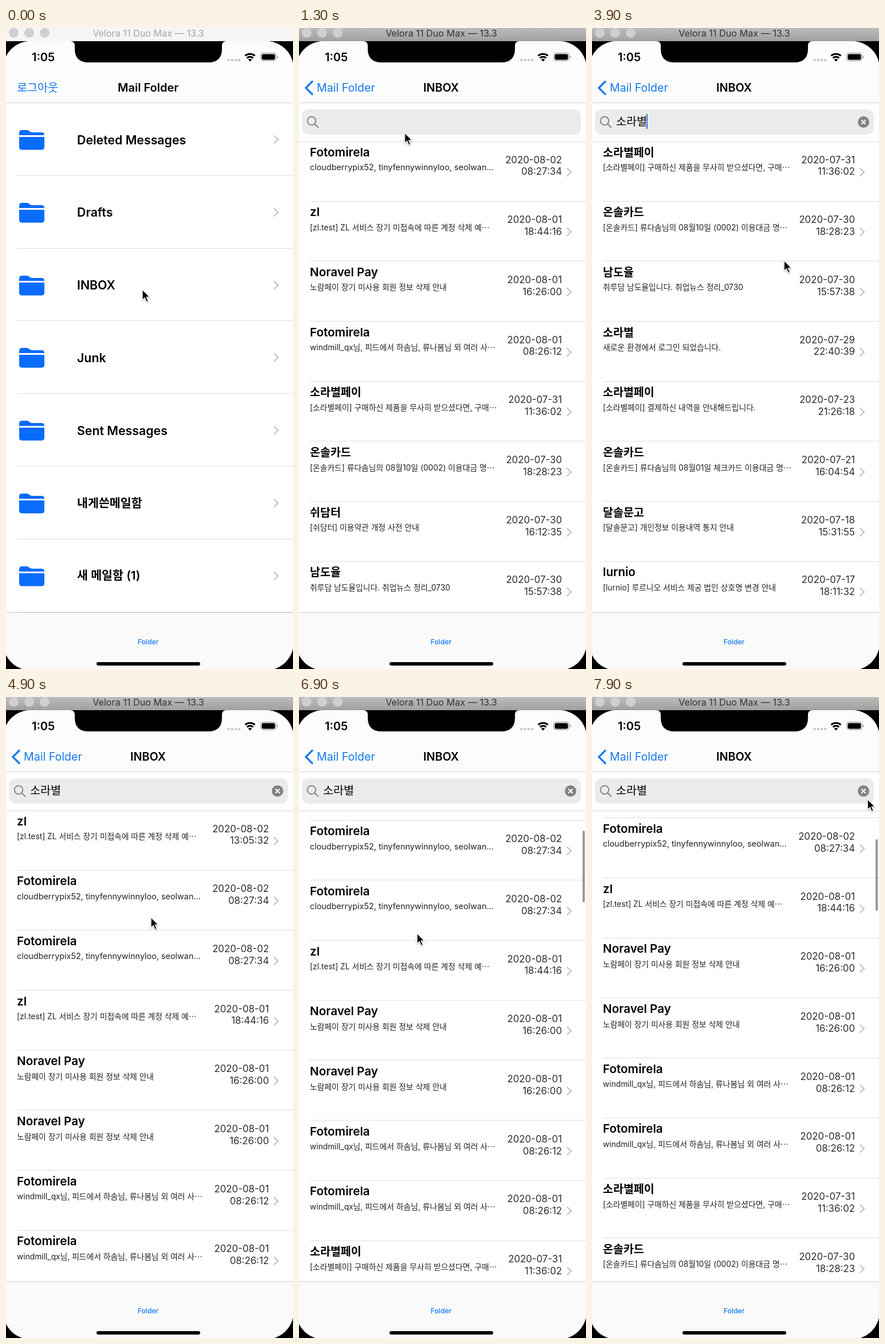
These frames come from a looping animation (501x1118 px, 8 s). An HTML page:

```html
<!DOCTYPE html>
<html lang="ko">
<head>
<meta charset="utf-8">
<title>Mail</title>
<style>
@property --push { syntax: "<number>"; inherits: true; initial-value: 0; }
@property --scroll { syntax: "<number>"; inherits: true; initial-value: 0; }

html, body { margin: 0; width: 100%; height: 100%; overflow: hidden; background: #000; }
body { position: relative; font-family: Inter, "Noto Sans CJK KR", "Noto Sans CJK", sans-serif; color: #000; }
div, b, p, time, svg, .label { position: absolute; margin: 0; white-space: nowrap; }
b { font-weight: 600; }
.label { line-height: 0; }
.blue { color: #1478f0; }

/* window title bar */
#bar { left: 0; top: 0; width: 501px; height: 23px; animation: bar 8s step-end infinite; }
#bar .label { left: 0; width: 497px; top: 9px; text-align: center; font-size: 16.2px; }
#bar i { position: absolute; top: 0; width: 17px; height: 17px; border-radius: 50%; animation: light 8s step-end infinite; }
#bar i:nth-of-type(1) { left: 5px; background: #fc4a48; }
#bar i:nth-of-type(2) { left: 32px; background: #fdb224; }
#bar i:nth-of-type(3) { left: 59px; background: #28c231; }
@keyframes bar {
  0% { background: #f5f5f5; color: #a5a5a5; }
  1.25%, 100% { background: linear-gradient(#bcbcbc, #a0a0a0); color: #333; }
}
@keyframes light { 0% { background: #cfcfcf; } }

/* phone screen */
#screen {
  left: 0; top: 0; width: 501px; height: 1118px; background: #fff;
  clip-path: inset(23px -1px -2px -5px round 48px);
  animation: push 8s infinite, scroll 8s infinite;
}
@keyframes push {
  0%, 3.625% { --push: 0; animation-timing-function: cubic-bezier(.38, .7, .125, 1); }
  9.875%, 100% { --push: 1; }
}
@keyframes scroll {
  0%, 72.5% { --scroll: 0; animation-timing-function: ease-in; }
  77.5% { --scroll: 15; animation-timing-function: linear; }
  86.25% { --scroll: 87; animation-timing-function: ease-out; }
  95%, 100% { --scroll: 196; }
}

#nav { left: 0; top: 0; width: 501px; height: 130px; background: #fcfcfc; border-bottom: 1px solid #cfcfcf; }
#nav .label { top: 104px; font-size: 20px; }
#nav .hangul { left: 19px; font-size: 19.6px; opacity: calc(1 - var(--push)); }
#nav .old, #nav .back { left: 31px; transform: translateX(calc((1 - var(--push)) * 164px)); }
#nav .old { opacity: calc(1 - 2 * var(--push)); }
#nav .back { font-size: 19.6px; opacity: calc(2 * var(--push) - 1); }
#nav .new { left: 217px; font-size: 19.8px; opacity: var(--push); transform: translateX(calc((1 - var(--push)) * 290px)); }
#nav .arrow { opacity: var(--push); }

#tabs { left: 0; top: 1019px; width: 501px; height: 99px; background: #fafafa; border-top: 1px solid #cdcdcd; }
#tabs .label { left: 0; width: 496px; top: 51px; text-align: center; font-size: 12.2px; font-weight: 500; }
#home { left: 158px; top: 1106px; width: 181px; height: 6px; border-radius: 3px; background: #000; }

.page { left: 0; top: 131px; width: 501px; height: 889px; }
#folders { transform: translateX(calc(var(--push) * -152px)); }
#dim { left: -5px; top: 131px; width: 507px; height: 889px; background: #000; opacity: calc(var(--push) * .12); }
#inbox { transform: translateX(calc((1 - var(--push)) * 507px)); }
#inbox::before { content: ""; position: absolute; inset: 0 -1px 0 -5px; background: #fff; }

/* rows */
.row { left: 0; width: 501px; }
.row::after { content: ""; position: absolute; left: 19px; right: 0; bottom: 0; height: 1px; background: #dedede; }
.row > i { position: absolute; left: 463px; width: 9px; height: 9px; border: solid #c1c1c4; border-width: 2.4px 2.4px 0 0; transform: rotate(45deg); }
.folder { height: 126.8px; }
.folder b { left: 124px; top: 63.5px; font-size: 21.3px; line-height: 0; }
.folder b.hangul { font-size: 20.6px; }
.folder > i { top: 58px; }
.folder svg { left: 23px; top: 46px; }
.folder:nth-child(3)::before { content: ""; position: absolute; inset: 0 0 0 -5px; background: #d0d0d5; visibility: hidden; animation: tap 8s step-end infinite; }
@keyframes tap { 0% { visibility: hidden; } 1.25%, 100% { visibility: visible; } }

.mail { height: 104.7px; }
.mail b { left: 19px; top: 18.5px; font-size: 20.6px; line-height: 0; }
.mail b.hangul { font-size: 19.5px; }
.mail p { left: 19px; top: 45px; font-size: 14.4px; line-height: 0; color: #222; }
.mail p.hangul { font-size: 13.8px; }
.mail time { right: 42px; top: 21.6px; font-size: 16.8px; line-height: 20.8px; text-align: right; color: #2c2c2c; }
.mail > i { top: 47.5px; }

#lists { left: 0; top: 67px; width: 501px; height: 822px; overflow: hidden; border-top: 1px solid #dcdcdc; box-sizing: border-box; }
.list { left: 0; top: -1px; width: 501px; height: 100%; animation: 8s step-end infinite; }
#all { animation-name: all; }
#found { animation-name: found; }
#merged { animation-name: merged; transform: translateY(calc(var(--scroll) * -1px)); }
@keyframes all { 0% { visibility: visible; } 30%, 100% { visibility: hidden; } }
@keyframes found { 0%, 50%, 100% { visibility: hidden; } 30% { visibility: visible; } }
@keyframes merged { 0% { visibility: hidden; } 50%, 100% { visibility: visible; } }

#thumb {
  left: 495px; top: 90px; width: 4px; height: 125px; border-radius: 2px; background: #999;
  transform: translateY(calc(var(--scroll) * .1376px)); animation: thumb 8s linear infinite;
}
@keyframes thumb { 0%, 72.5% { opacity: 0; } 75%, 100% { opacity: 1; } }

/* search field */
#field { left: 5px; top: 11px; width: 487px; height: 44px; border-radius: 12px; background: #ebebeb; }
#field .label { left: 37px; top: 21px; font-size: 19.6px; }
#field .label::before { content: ""; animation: type 8s step-end infinite; }
#caret { display: inline-block; width: 2px; height: 26px; margin-bottom: -20px; vertical-align: 0; background: #456be0; position: absolute; top: -13px; margin-left: -1px; animation: blink 8s step-end infinite; }
#clear { left: 459px; top: 12px; animation: clear 8s step-end infinite; }
@keyframes type {
  0% { content: ""; }
  20% { content: "ㅅ"; }
  21.25% { content: "소"; }
  22.5% { content: "솔"; }
  23.75% { content: "소라"; }
  25% { content: "소랍"; }
  26.25% { content: "소라벼"; }
  27.5%, 100% { content: "소라별"; }
}
@keyframes blink {
  0%, 40%, 57.5%, 70%, 82.5%, 95%, 100% { opacity: 0; }
  17.5%, 45%, 63.75%, 76.25%, 88.75% { opacity: 1; }
}
@keyframes clear { 0% { visibility: hidden; } 20%, 100% { visibility: visible; } }

#cursor { left: -2px; top: -2px; animation: point 8s infinite; filter: drop-shadow(0 1px 1px #0005); }
@keyframes point {
  0%, 2.5% { transform: translate(238px, 456px); }
  6.25% { transform: translate(137px, 314px); }
  12.5%, 15% { transform: translate(140px, 235px); }
  17.5%, 43.75% { transform: translate(195px, 170px); }
  56.25% { transform: translate(400px, 514px); }
  61.25% { transform: translate(253px, 384px); }
  67.5%, 77.5% { transform: translate(189px, 409px); }
  86.25%, 91.25% { transform: translate(206px, 412px); }
  98.75%, 100% { transform: translate(481px, 178px); }
}
</style>
</head>
<body>
<div id="screen">
  <div id="folders" class="page"></div>
  <div id="dim"></div>
  <div id="inbox" class="page">
    <div id="lists">
      <div id="all" class="list"></div>
      <div id="found" class="list"></div>
      <div id="merged" class="list"></div>
    </div>
    <div id="field">
      <svg width="34" height="44" fill="none" stroke="#858589" stroke-width="2">
        <circle cx="17" cy="20" r="7.3"/><path d="M22.3 25.3l6 6" stroke-linecap="round"/>
      </svg>
      <span class="label"><span id="caret"></span></span>
      <svg id="clear" width="20" height="20">
        <circle cx="10" cy="10" r="10" fill="#828286"/>
        <path d="M6.3 6.3l7.4 7.4m0-7.4l-7.4 7.4" stroke="#fff" stroke-width="2"/>
      </svg>
    </div>
    <div id="thumb"></div>
  </div>

  <div id="nav">
    <svg class="arrow" width="30" height="130" fill="none" stroke="#1478f0" stroke-width="3.2">
      <path d="M24 92.5L12 104.5 24 116.5"/>
    </svg>
    <span class="label blue hangul">로그아웃</span>
    <b class="label old">Mail Folder</b>
    <span class="label blue back">Mail Folder</span>
    <b class="label new">INBOX</b>
    <b class="label" style="left:45px;top:51px">1:05</b>
    <svg width="501" height="70">
      <path d="M112 23q8 0 8 8v5q0 24 24 24h209q24 0 24-24v-5q0-8 8-8z"/>
      <path d="M388.5 56h22" stroke="#c9c9c9" stroke-width="4.6" stroke-linecap="round" stroke-dasharray="0 6.2"/>
      <g fill="none" stroke="#000" stroke-width="3">
        <path d="M417.5 48.5a12.5 12.5 0 0 1 17 0M420.6 52.3a8 8 0 0 1 10.8 0"/>
      </g>
      <path d="M426 58.5l-3.2-3.4a4.6 4.6 0 0 1 6.4 0z"/>
      <rect x="444.6" y="43.6" width="26.8" height="13.6" rx="4" fill="none" stroke="#a2a2a2" stroke-width="1.2"/>
      <rect x="446.4" y="45.4" width="23.2" height="10" rx="2.6"/>
      <path d="M473 48v5q2-.8 2-2.5t-2-2.5z" fill="#a2a2a2"/>
    </svg>
  </div>

  <div id="tabs"><span class="label blue">Folder</span></div>
  <div id="home"></div>
</div>

<div id="bar"><i></i><i></i><i></i><span class="label">Velora 11 Duo Max — 13.3</span></div>

<svg id="cursor" width="20" height="28">
  <path d="M2 2v18.5l4.2-3.8 3 7 3.2-1.4-3-6.8h5.8z" stroke="#fff" stroke-width="1.4"/>
</svg>

<script>
const folders = ["Deleted Messages", "Drafts", "INBOX", "Junk", "Sent Messages", "내게쓴메일함", "새 메일함 (1)"];

const expiry = "[zl.test] ZL 서비스 장기 미접속에 따른 계정 삭제 예⋯";
const mails = [
  ["zl", expiry, "2020-08-02", "13:05:32"],
  ["Fotomirela", "cloudberrypix52, tinyfennywinnyloo, seolwan...", "2020-08-02", "08:27:34"],
  ["zl", expiry, "2020-08-01", "18:44:16"],
  ["Noravel Pay", "노람페이 장기 미사용 회원 정보 삭제 안내", "2020-08-01", "16:26:00"],
  ["Fotomirela", "windmill_qx님, 피드에서 하솜님, 류나봄님 외 여러 사⋯", "2020-08-01", "08:26:12"],
  ["소라별페이", "[소라별페이] 구매하신 제품을 무사히 받으셨다면, 구매⋯", "2020-07-31", "11:36:02"],
  ["온솔카드", "[온솔카드] 류다솜님의 08월10일 (0002) 이용대금 명⋯", "2020-07-30", "18:28:23"],
  ["쉬담터", "[쉬담터] 이용약관 개정 사전 안내", "2020-07-30", "16:12:35"],
  ["남도율", "취루담 남도율입니다. 취업뉴스 정리_0730", "2020-07-30", "15:57:38"],
  ["소라별", "새로운 환경에서 로그인 되었습니다.", "2020-07-29", "22:40:39"],
  ["소라별페이", "[소라별페이] 결제하신 내역을 안내해드립니다.", "2020-07-23", "21:26:18"],
  ["온솔카드", "[온솔카드] 류다솜님의 08월01일 체크카드 이용대금 명⋯", "2020-07-21", "16:04:54"],
  ["달솔문고", "[달솔문고] 개인정보 이용내역 통지 안내", "2020-07-18", "15:31:55"],
  ["lurnio", "[lurnio] 루르니오 서비스 제공 법인 상호명 변경 안내", "2020-07-17", "18:11:32"],
];

const lists = {
  all: [1, 2, 3, 4, 5, 6, 7, 8],
  found: [5, 6, 8, 9, 10, 11, 12, 13],
  merged: [0, 1, 1, 2, 3, 3, 4, 4, 5, 6],
};

const icon = `<svg width="44" height="36" fill="#0a6cfa">
  <path d="M0 10V6q0-5 5-5h8q2.500 0 4 1.400l1.500 1.200q1.500 1.400 4 1.400H39q5 0 5 5z"/>
  <path d="M0 13h44v17.500q0 5-5 5H5q-5 0-5-5z"/></svg>`;

const tag = (name, text) => `<${name} class="${/[가-힣]/.test(text) ? "hangul" : ""}">${text}</${name}>`;
const row = (kind, height, index, body) =>
  `<div class="row ${kind}" style="top:${(index * height).toFixed(1)}px">${body}<i></i></div>`;
const fill = (id, html) => { document.getElementById(id).innerHTML = html.join(""); };

fill("folders", folders.map((name, i) => row("folder", 126.8, i, icon + tag("b", name))));

for (const [id, order] of Object.entries(lists)) {
  fill(id, order.map((key, i) => {
    const [name, text, date, time] = mails[key];
    return row("mail", 104.7, i, tag("b", name) + tag("p", text) + `<time>${date}<br>${time}</time>`);
  }));
}
</script>
</body>
</html>
```
